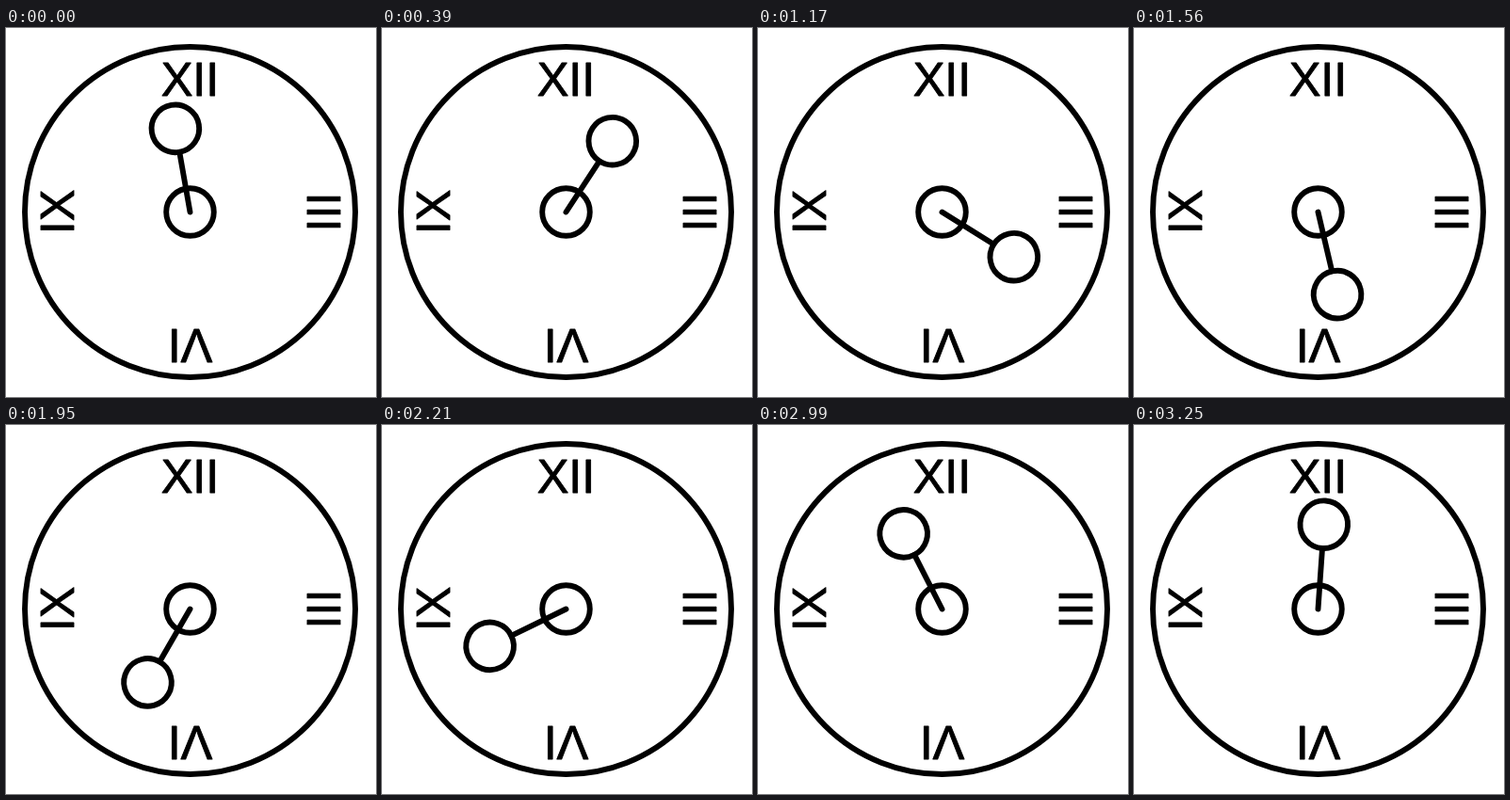
These frames come from a looping animation (393 px wide and 392 px high, 3380 ms). An HTML page with a canvas:

```html
<!DOCTYPE html>
<html lang="en">
<head>
<meta charset="utf-8">
<title>Clock</title>
<style>
  html, body { margin: 0; width: 100%; height: 100%; overflow: hidden; background: #fff; }
  canvas { display: block; filter: blur(0.5px); }
</style>
</head>
<body>
<canvas id="stage" width="393" height="392"></canvas>
<script>
const ctx = document.getElementById('stage').getContext('2d');
const STEP_MS = 130;
const STEPS = 26;
const CENTER = 195.5;
const FACE_RADIUS = 175.5;
const RING_RADIUS = 25.3;
const ARM = 90;
const LINE = 5.9;
const NUMERALS = ['XII', 'III', 'VI', 'IX'];

// [step, degrees clockwise from twelve]
const POSES = [[0, -10], [5, 62], [9, 122], [10, 138], [15, 210], [17, 244], [20, 287.5], [21, 302], [25, 364]];

function angleAt(step) {
  const i = Math.max(1, POSES.findIndex(([s]) => s >= step));
  const [s0, a0] = POSES[i - 1];
  const [s1, a1] = POSES[i];
  return (a0 + (a1 - a0) * (step - s0) / (s1 - s0)) * Math.PI / 180;
}

function ring(y, radius) {
  ctx.beginPath();
  ctx.arc(0, y, radius, 0, Math.PI * 2);
  ctx.stroke();
}

function drawNumerals() {
  ctx.lineWidth = 0.9;
  for (const numeral of NUMERALS) {
    ctx.fillText(numeral, 0, -124);
    ctx.strokeText(numeral, 0, -124);
    ctx.rotate(Math.PI / 2);
  }
}

function drawHand(angle) {
  ctx.rotate(angle);
  ctx.beginPath();
  ctx.moveTo(0, 0);
  ctx.lineTo(0, RING_RADIUS - ARM);
  ctx.stroke();
  ring(-ARM, RING_RADIUS);
}

function draw(now) {
  const step = Math.floor(now / STEP_MS) % STEPS;
  ctx.setTransform(1, 0, 0, 1, 0, 0);
  ctx.fillStyle = '#fff';
  ctx.fillRect(0, 0, 393, 392);
  ctx.translate(CENTER, CENTER);
  ctx.fillStyle = ctx.strokeStyle = '#000';
  ctx.lineCap = ctx.lineJoin = 'round';
  ctx.font = '50.5px "Liberation Sans", Arial, sans-serif';
  ctx.textAlign = 'center';
  drawNumerals();
  ctx.lineWidth = LINE;
  ring(0, FACE_RADIUS);
  ring(0, RING_RADIUS);
  drawHand(angleAt(step));
}

const start = performance.now();
function tick() {
  draw(performance.now() - start);
  requestAnimationFrame(tick);
}
tick();
</script>
</body>
</html>
```
